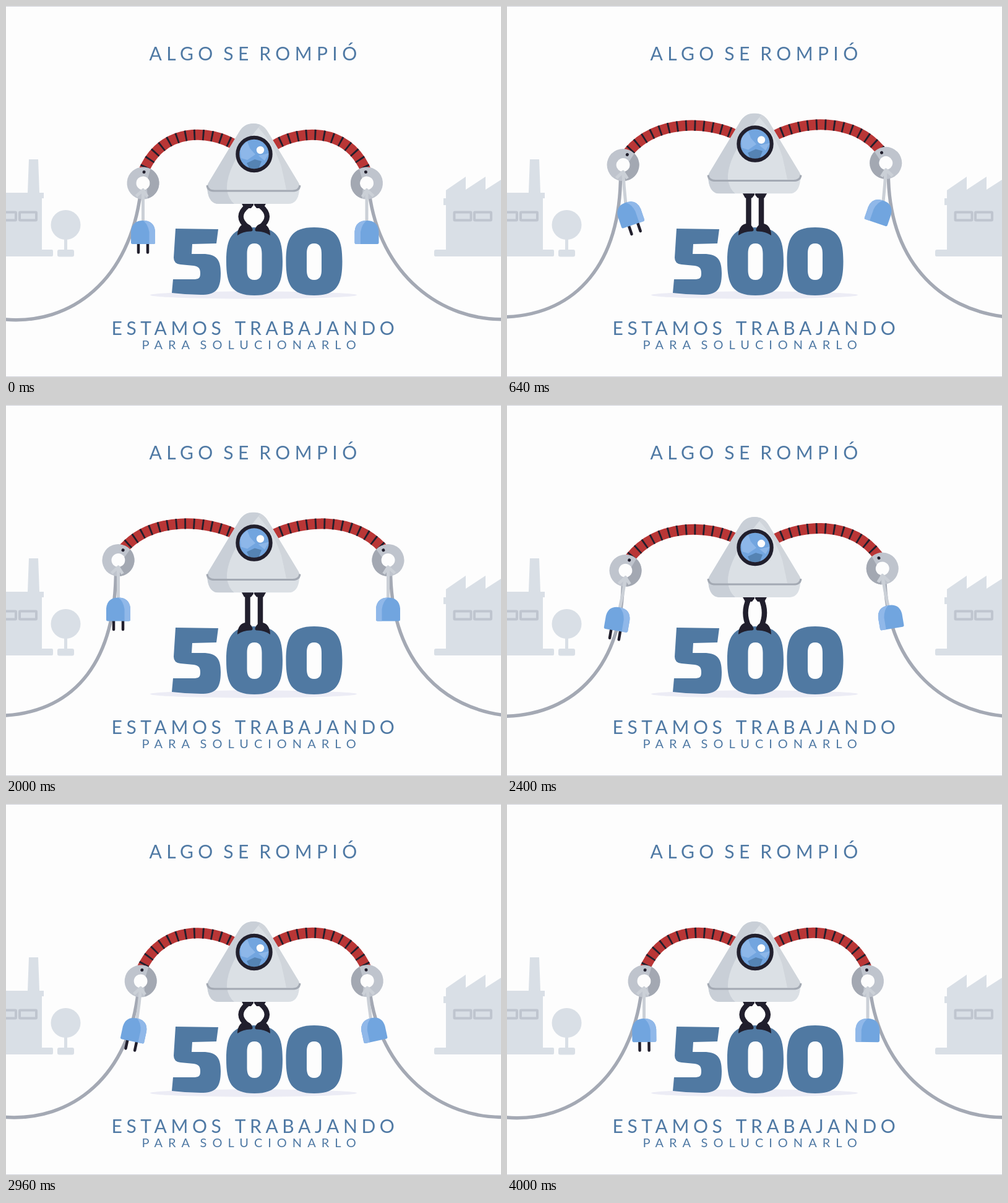
An HTML page for the animation above (4.08 s loop, 800x600 px).

```html
<!DOCTYPE html>
<html lang="es">
<head>
<meta charset="utf-8">
<title>Error 500</title>
<style>
  html, body { margin: 0; width: 100%; height: 100%; overflow: hidden; background: #fdfdfd; }
  svg { display: block; width: 100%; height: 100%; }
  text { font-family: Lato, "Open Sans", sans-serif; font-size: 30px; fill: #4f79a4; }
  .line { fill: none; }
  .building { fill: #d9dfe6; }
  .window { fill: none; stroke: #bfc5cf; stroke-width: 4; }
  .dark { fill: #211f2d; }
  .light { fill: none; stroke: #cbd0d7; stroke-width: 5; stroke-linejoin: round; }
</style>
</head>
<body>
<svg viewBox="0 0 800 600" xmlns="http://www.w3.org/2000/svg">
  <rect width="800" height="600" fill="#fdfdfd"/>
  <path d="M0 .5H800M0 599.5H800" stroke="#d3d4dc"/>

  <g class="building">
    <path d="M37 248H52L54 302H61V311H58V394H74Q76 394 76 396V403Q76 405 74 405H0V302H35Z"/>
    <circle cx="96.5" cy="354" r="24"/>
    <rect x="94" y="375" width="5" height="22"/>
    <rect x="83" y="394" width="27" height="11.5" rx="3"/>
    <path d="M711 394V322H707V311H711V298L743 276V297L775 276V297L800 281V405H695Q692 405 692 403V397Q692 394 695 394Z"/>
  </g>
  <g class="window">
    <rect id="window" x="22" y="333.5" width="27" height="13" rx="1"/>
    <use href="#window" x="-33"/>
    <use href="#window" x="702.5"/>
    <use href="#window" x="735"/>
  </g>

  <text x="231.5" y="87.5" letter-spacing="7.4" word-spacing="-5.5">ALGO SE ROMPIÓ</text>
  <text x="170.5" y="532" letter-spacing="6.6" word-spacing="2">ESTAMOS TRABAJANDO</text>
  <text x="219.5" y="555" letter-spacing="9" word-spacing="-6" style="font-size:20px">PARA SOLUCIONARLO</text>

  <ellipse cx="400" cy="467.5" rx="167" ry="6" fill="#ececf5"/>
  <g fill="#5079a2" fill-rule="evenodd" role="img" aria-label="500">
    <path d="M274 360L343 361L340 384L301 385L300 401H318C340 401 347 410 347 432C347 460 338 467 315 467Q292 467 268 464L270 442H302C312 442 314 440 314 432C314 424 311 421 303 420L282 418Q271 417 271 407Z"/>
    <path id="zero" d="M401.5 358C439 358 447 376 447 413C447 450 439 468 401.5 468C364 468 356 450 356 413C356 376 364 358 401.5 358ZM401.5 384C392 384 389.5 391 389.5 401V427C389.5 436 392 443 401.5 443C411 443 413.5 436 413.5 427V401C413.5 391 411 384 401.5 384Z"/>
    <use href="#zero" x="96.5"/>
  </g>

  <g id="limbs"></g>

  <path id="legs" class="line" stroke="#211f2d" stroke-width="8.5"/>
  <g class="dark">
    <path id="foot" d="M374 371C374 359 380 352 388 352Q396 353 398.5 361Q399 364 396 364.5Q384 364 374 371Z"/>
    <use href="#foot" transform="translate(801 0) scale(-1 1)"/>
  </g>

  <g id="body">
    <path class="dark" d="M380 318H400V322L396 327H385ZM401 318H421L416 327H405L401 322Z"/>
    <clipPath id="shell">
      <path d="M376 205Q384 190 400 190Q416 190 424 205L471 283Q477 292 474 298Q472 320 456 320H344Q328 320 325.5 298Q323 292 329 283Z"/>
    </clipPath>
    <g clip-path="url(#shell)">
      <rect x="320" y="185" width="160" height="140" fill="#dbe0e5"/>
      <path d="M320 185H418Q395 210 373 245Q356 275 357 296Q359 312 369 320H320Z" fill="#c9cfd7"/>
      <path d="M418 185L408 197Q434 225 445 260Q450 282 453 297H480V185Z" fill="#d0d5db"/>
    </g>
    <path class="line" d="M325 290Q326 299 337 299H463Q474 299 475 290" stroke="#a3a9b3" stroke-width="3"/>
    <clipPath id="lens"><circle cx="401" cy="239.5" r="24"/></clipPath>
    <g clip-path="url(#lens)">
      <rect x="376" y="214" width="50" height="50" fill="#72a5df"/>
      <path d="M378 230L390 219L394 230L403 240L390 249L380 246ZM408 242L425 238L418 250Z" fill="#8db7e9"/>
      <path d="M389 254L402 248L413 251L408 264H394Z" fill="#5583b3"/>
    </g>
    <circle class="line" cx="401" cy="239.5" r="26.7" stroke="#211f2d" stroke-width="6"/>
    <circle cx="411" cy="233" r="6.2" fill="#fdfdfd"/>
  </g>
</svg>

<script>
const LOOP = 4080, STEP = 80, LIFT = 16.5, MIRROR = 804.5, REST_X = 221.5, REST_Y = 286.5;
const LEFT = { reach: 40, curl: 2.3, fallEnd: 3200, slack: 10, prongs: true };
const RIGHT = { reach: 34.5, curl: 1, fallEnd: 3060, slack: 3, prongs: false };

const $ = id => document.getElementById(id);
const progress = (t, from, to) => Math.min(1, Math.max(0, (t - from) / (to - from)));
const ease = (t, from, to) => (1 - Math.cos(Math.PI * progress(t, from, to))) / 2;
const pulse = (t, from, to) => Math.sin(Math.PI * progress(t, from, to)) ** 2;
const sind = deg => Math.sin(deg * Math.PI / 180);
const cosd = deg => Math.cos(deg * Math.PI / 180);

// The plug trails behind the hand, then swings back a little
const sway = (t, rise, fall) =>
  rise * (pulse(t, 0, 960) - .25 * pulse(t, 960, 1900)) +
  fall * (pulse(t, 2000, 3300) - .2 * pulse(t, 3050, 4080));

function limb(t, lift, { reach, curl, fallEnd, slack, prongs }) {
  const raised = ease(t, 0, 860) - ease(t, 2000, fallEnd), low = 1 - raised, up = lift * LIFT;
  const x = REST_X - reach * raised, y = REST_Y - up - 19 * raised ** curl;
  const ringAngle = 5 + 20 * raised;
  const endX = x + 22 * sind(ringAngle), endY = y - 22 * cosd(ringAngle);
  const arm = `M372 ${226 - up}C${330 - 5 * raised} ${199.5 - up + 3.5 * raised} ` +
    `${x + 33 + 25 * raised} ${y - 91 + 19 * raised} ${endX} ${endY}`;
  const cable = `M${x - 4} ${y + 15}C${x - 4 - 17 * low * low} ${400 + 30 * low + slack} ` +
    `${100 + 8 * raised + slack * .8} ${508 - 22 * raised + slack} -6 ${506.5 - 4 * raised}`;

  const swing = sway(t, -12, 16), tilt = sway(t - 60, -21, 18);
  const plugX = x - 68 * sind(swing), plugY = y + 12 + 68 * cosd(swing);
  const topX = plugX + 20 * sind(tilt), topY = plugY - 20 * cosd(tilt);
  return `
    <path class="line" d="${arm}" stroke="#b93636" stroke-width="17"/>
    <path class="line" d="${arm}" stroke="#211f2d" stroke-width="17" stroke-dasharray="2.8 11.5" stroke-dashoffset="-12"/>
    <path class="line" d="${cable}" stroke="#a4a9b4" stroke-width="5.5"/>
    <g transform="translate(${x} ${y}) rotate(${ringAngle})">
      <circle class="line" r="18.5" stroke="#bfc4cd" stroke-width="15"/>
      <path d="M10 -24A26 26 0 0 1 10 24L7 8.5A11 11 0 0 0 7 -8.5Z" fill="#a3a8b2"/>
      <circle class="dark" cy="-18" r="2.5"/>
    </g>
    <path class="light" d="M${x - 11} ${y + 21}L${x} ${y + 11}L${x + 7} ${y + 22}"/>
    <path class="light" d="M${x} ${y + 11}Q${x + (topX - x) * .35} ${y + 36} ${topX} ${topY + 2}"/>
    <g transform="translate(${plugX} ${plugY}) rotate(${tilt})">
      ${prongs ? '<path d="M-7.5 18V32M7.5 18V32" stroke="#211f2d" stroke-width="4.5" stroke-linecap="round"/>' : ''}
      <path d="M-19.5 16V-2Q-18 -19.5 0 -19.5Q18 -19.5 19.5 -2V16Q19.5 18.5 17 18.5H-17Q-19.5 18.5 -19.5 16Z" fill="#71a5df"/>
      <path d="M0 -19.5Q18 -19.5 19.5 -2V16Q19.5 18.5 17 18.5H10V-1Q8 -14 0 -19.5Z" fill="#90b8e9"/>
    </g>`;
}

function draw(t) {
  const lift = ease(t, 0, 640) - ease(t, 2040, 2800), up = lift * LIFT;
  $('limbs').innerHTML = limb(t, lift, LEFT) +
    `<g transform="translate(${MIRROR} 0) scale(-1 1)">${limb(t, lift, RIGHT)}</g>`;
  $('body').setAttribute('transform', `translate(0 ${-up})`);

  const hip = 323 - up, knee = (358 - hip) / 3, bow = 14.5 * (1 - lift);
  const leg = (x, bend) => `M${x} ${hip}C${x + bend} ${hip + knee} ${x + bend} ${358 - knee} ${x} 358`;
  $('legs').setAttribute('d', leg(390.5, -bow) + leg(411, bow));
}

const start = performance.now();
function frame() {
  const t = (performance.now() - start) % LOOP;
  draw(Math.floor(t / STEP) * STEP);
  requestAnimationFrame(frame);
}
frame();
</script>
</body>
</html>
```
